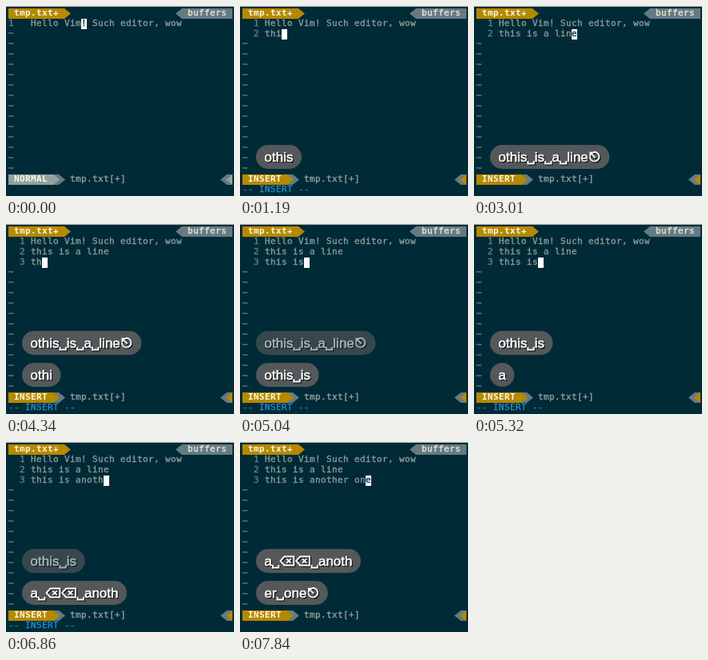
An HTML page for the animation above (8 s loop, 285 by 238 pixels).

```html
<!DOCTYPE html>
<html lang="en">
<head>
<meta charset="utf-8">
<title>Typing in a terminal editor</title>
<style>
  html, body { margin: 0; width: 100%; height: 100%; overflow: hidden; background: #002b36; }
  svg { display: block; width: 100%; height: 100%; }
  text { white-space: pre; }
  .mono { font: 11px "DejaVu Sans Mono", monospace; letter-spacing: .378px; stroke-width: .35; }
  .bold { font-weight: bold; stroke-width: 0; }
  .keys { font: 17px "Liberation Sans", Arial, sans-serif; fill: #fff; stroke: #fff; stroke-width: .55; }
  .icon { fill: none; stroke: #fff; stroke-width: 1.9; }
  .label { filter: drop-shadow(1px 1px .4px #000); }
</style>
</head>
<body>
<svg id="stage" viewBox="0 0 285 238"></svg>
<script>
const LOOP = 8000, TICK = 70;
const CELL = 7, ROW = 13, LEFT = 3, TOP = 3;
const C = {
  bg: '#002b36', edge: '#b4b4b4', text: '#8b9b9c', dim: '#6c7f85', grey: '#657b83',
  pale: '#93a1a1', gold: '#b58900', cream: '#fdf6e3', blue: '#268bd2', pill: '#54585a'
};

// Each burst of keys shares a pill; times are in ticks, "+" means the editor reacts one tick later.
const bursts = [
  ['othis␣is␣a␣line⎋', '7+ 11+ 14 15+ 17+ 19 21 23+ 26 28+ 30 32+ 34+ 37 38 42+'],
  ['othis␣is', '52 57 60 62+ 63+ 65 66 68'],
  ['a␣⌫⌫␣anoth', '76+ 78+ 81+ 83 85 86+ 88+ 90 91 92'],
  ['er␣one⎋', '101+ 103 104 105 107 108+ 111+']
].map(([keys, times]) => {
  const at = times.split(' ');
  return [...keys].map((key, i) => ({
    key, shown: parseInt(at[i]), done: parseInt(at[i]) + (at[i].endsWith('+') ? 1 : 0)
  }));
});

const icons = {
  '␣': { width: 9.4, path: 'M1 -1V2.5H8.4V-1' },
  '⌫': { width: 19.6, path: 'M1.2 -6L6.2 -11.5H18V-.5H6.2ZM9 -8.7L14.4 -3.3M14.4 -8.7L9 -3.3' },
  '⎋': { width: 16, path: 'M6.5 -11.8A5.8 5.8 0 1 1 2.1 -6.2M8.8 -5L3 -10.8M2.6 -6.8V-11.2H7' }
};

const stage = document.getElementById('stage');
const pen = document.createElement('canvas').getContext('2d');
pen.font = '17px "Liberation Sans", Arial, sans-serif';

const colX = col => LEFT + col * CELL;
const rowY = row => TOP + row * ROW;

function put(col, row, str, fill, cls = '') {
  return `<text class="mono ${cls}" x="${colX(col)}" y="${rowY(row) + 9}" fill="${fill}" stroke="${fill}">${str}</text>`;
}

function block(col, row, cols, fill) {
  return `<rect x="${colX(col)}" y="${rowY(row)}" width="${cols * CELL}" height="${ROW}" fill="${fill}"/>`;
}

// Triangle slightly wider than its cell; dir 1 points right, -1 points left.
function arrow(col, row, dir, fill) {
  const base = colX(dir > 0 ? col : col + 1), y = rowY(row), reach = dir * (CELL + 1);
  return `<path d="M${base} ${y}l${reach} ${ROW / 2}l${-reach} ${ROW / 2}z" fill="${fill}"/>`;
}

function editorAt(tick) {
  const s = { lines: ['Hello Vim! Such editor, wow'], started: false, insert: false };
  for (const { key, done } of bursts.flat()) {
    if (done > tick) break;
    const last = s.lines.length - 1;
    if (!s.insert) {
      s.lines.push('');
      s.insert = s.started = true;
    } else if (key === '⎋') s.insert = false;
    else if (key === '⌫') s.lines[last] = s.lines[last].slice(0, -1);
    else s.lines[last] += key === '␣' ? ' ' : key;
  }
  return s;
}

function drawBars(started) {
  const mode = started ? C.gold : C.pale;
  return block(0, 0, 10, C.gold) + arrow(10, 0, 1, C.gold) + put(1, 0, 'tmp.txt+', C.cream, 'bold')
    + arrow(30, 0, -1, C.grey) + block(31, 0, 9, C.grey) + put(32, 0, 'buffers', '#eee8d5')
    + block(0, 16, 8, mode) + block(8, 16, 1, C.grey)
    + arrow(9, 16, 1, C.grey) + arrow(8, 16, 1, mode)
    + put(1, 16, started ? 'INSERT' : 'NORMAL', C.cream, 'bold')
    + put(11, 16, 'tmp.txt[+]', C.pale)
    + arrow(38, 16, -1, C.grey) + block(39, 16, 1, C.grey) + arrow(39, 16, -1, mode);
}

function drawEditor({ lines, started, insert }) {
  let out = '';
  lines.forEach((line, i) => {
    out += put(started ? 2 : 0, i + 1, i + 1, C.dim) + put(4, i + 1, line, C.text);
  });
  for (let row = lines.length + 1; row < 16; row++) out += put(0, row, '~', C.dim);

  const line = lines[lines.length - 1];
  const at = !started ? 9 : insert ? line.length : line.length - 1;
  out += block(4 + at, lines.length, 1, '#fff') + put(4 + at, lines.length, line[at] || '', C.bg);
  return out + (insert ? put(0, 17, '-- INSERT --', C.blue) : '');
}

function drawPill(keys, y, alpha) {
  let x = 30.5, label = '';
  for (const part of keys.match(/[a-z]+|[^a-z]/g)) {
    const icon = icons[part];
    label += icon
      ? `<path class="icon" transform="translate(${x} ${y + 21})" d="${icon.path}"/>`
      : `<text class="keys" x="${x}" y="${y + 21}">${part}</text>`;
    x += icon ? icon.width : pen.measureText(part).width;
  }
  return `<g opacity="${alpha}"><rect x="20" y="${y}" width="${x - 9.5}" height="30" rx="15" fill="${C.pill}"/>`
    + `<g class="label">${label}</g></g>`;
}

function drawPills(tick) {
  const typed = bursts.map(b => b.filter(k => k.shown <= tick)).filter(b => b.length);
  return typed.slice(-2).reverse().map((keys, i) => {
    const age = tick - keys[keys.length - 1].shown;
    const alpha = Math.min(1, 1 - (age - 29) * .34);
    return alpha > 0 ? drawPill(keys.map(k => k.key).join(''), 174 - 40 * i, alpha) : '';
  }).join('');
}

let lastTick = -1;
function update(ms) {
  const tick = Math.floor((ms % LOOP) / TICK);
  if (tick === lastTick) return;
  lastTick = tick;
  const state = editorAt(tick);
  stage.innerHTML = `<rect width="285" height="238" fill="${C.bg}"/><rect width="285" height="1" fill="${C.edge}"/>`
    + drawBars(state.started) + drawEditor(state) + drawPills(tick);
}

const start = performance.now();
function frame() {
  update(performance.now() - start);
  requestAnimationFrame(frame);
}
frame();
</script>
</body>
</html>
```
